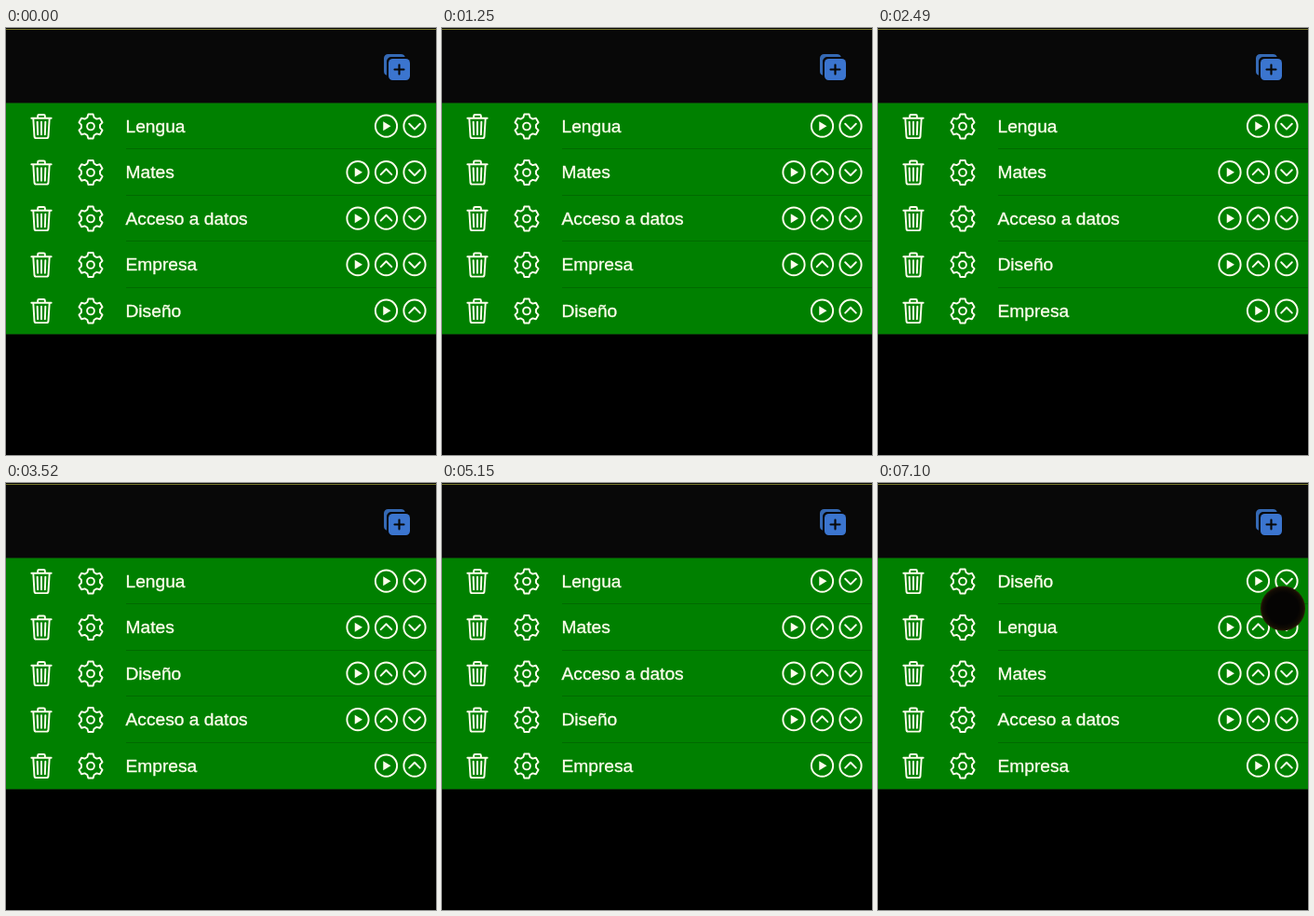
Recreate the animation shown at these times as an HTML page. Size 462x458 px, loop 7.15 s.

```html
<!DOCTYPE html>
<html lang="es">
<head>
<meta charset="utf-8">
<style>
  html, body { margin: 0; width: 100%; height: 100%; overflow: hidden; background: #000; }
  svg { display: block; }
  text { font: 19.2px "Liberation Sans", Arial, sans-serif; fill: #fdfdec; stroke: #fdfdec; stroke-width: .35; }
  symbol { overflow: visible; }
  .line { fill: none; stroke: #fdfdec; stroke-width: 32; stroke-linecap: round; stroke-linejoin: round; }
  .solid { fill: #fdfdec; }
</style>
</head>
<body>
<svg id="stage" width="462" height="458" viewBox="0 0 462 458">
  <defs>
    <radialGradient id="shade">
      <stop offset=".7" stop-color="#050403"/>
      <stop offset=".9" stop-color="#120c04"/>
      <stop offset="1" stop-color="#2a1e06"/>
    </radialGradient>
    <symbol id="trash" viewBox="0 0 512 512">
      <path class="line" d="M112 112l20 320c1 18 14 32 32 32h184c18 0 31-14 32-32l20-320M80 112h352M192 112V72a24 24 0 0 1 24-24h80a24 24 0 0 1 24 24v40M256 176v224M184 176l8 224M328 176l-8 224"/>
    </symbol>
    <symbol id="gear" viewBox="0 0 512 512">
      <circle class="line" cx="256" cy="256" r="64"/>
      <polygon class="line" id="teeth"/>
    </symbol>
    <symbol id="play" viewBox="0 0 512 512">
      <circle class="line" cx="256" cy="256" r="192"/>
      <path class="solid" d="M202 174L338 256L202 338z"/>
    </symbol>
    <symbol id="up" viewBox="0 0 512 512">
      <path class="line" d="M352 296l-96-96-96 96"/>
      <circle class="line" cx="256" cy="256" r="192"/>
    </symbol>
    <symbol id="down" viewBox="0 0 512 512">
      <path class="line" d="M352 216l-96 96-96-96"/>
      <circle class="line" cx="256" cy="256" r="192"/>
    </symbol>
  </defs>

  <rect width="462" height="80" fill="#080808"/>
  <rect y="1" width="462" height="1" fill="#77772c"/>
  <g transform="translate(404 26) scale(.0625)">
    <path fill="#3569b4" d="M396 80A72 72 0 0 0 328 32H104a72 72 0 0 0-72 72v224a72 72 0 0 0 48 68V160a80 80 0 0 1 80-80z"/>
    <rect x="112" y="112" width="368" height="368" rx="72" fill="#3b75cf"/>
    <path d="M296 216v160M216 296h160" stroke="#080808" stroke-width="34" stroke-linecap="round"/>
  </g>
  <rect y="80.5" width="462" height="248" fill="#008000"/>
  <rect y="80" width="462" height="1" fill="#0a4a08"/>
  <rect y="328" width="462" height="1" fill="#0a3a08"/>
  <g id="rows"></g>
  <circle id="dot" r="24" fill="url(#shade)"/>
</svg>
<script>
const LOOP = 7150, ROWS = 5, TOP = 105.2, PITCH = 49.5;
const $ = id => document.getElementById(id);

// Six gear teeth, four corners each
const corners = [[-21, 168], [-11.4, 218], [11.4, 218], [21, 168]];
const points = [];
for (let i = 0; i < 6; i++)
  for (const [deg, r] of corners) {
    const a = (i * 60 + deg - 90) * Math.PI / 180;
    points.push(256 + r * Math.cos(a), 256 + r * Math.sin(a));
  }
$('teeth').setAttribute('points', points.join(' '));

const icon = (name, x, y) =>
  `<use href="#${name}" x="${x - 15.5}" y="${y - 15.5}" width="31" height="31"/>`;

let markup = '';
for (let i = 0; i < ROWS; i++) {
  const y = TOP + i * PITCH;
  const buttons = ['play'];
  if (i > 0) buttons.push('up');
  if (i < ROWS - 1) buttons.push('down');
  markup += icon('trash', 38, y + .3) + icon('gear', 91, y + .3);
  buttons.reverse().forEach((name, k) => markup += icon(name, 439 - k * 30.5, y));
  markup += `<text x="128.5" y="${Math.round(y + 6.7)}"></text>`;
  if (i < ROWS - 1)
    markup += `<rect x="129" y="${Math.round(y + 23.8)}" width="333" height="1" fill="#006a00"/>`;
}
$('rows').innerHTML = markup;
const labels = document.querySelectorAll('#rows text');

// [time, index of the row that trades places with the next one]
const swaps = [[1900, 3], [3050, 2], [4450, 2], [5300, 2], [5720, 1], [6800, 0]];

function draw(now) {
  const t = now % LOOP;
  const names = ['Lengua', 'Mates', 'Acceso a datos', 'Empresa', 'Diseño'];
  for (const [at, i] of swaps)
    if (t >= at) [names[i], names[i + 1]] = [names[i + 1], names[i]];
  names.forEach((name, i) => {
    if (labels[i].textContent !== name) labels[i].textContent = name;
  });

  const p = Math.min(1, Math.max(0, (t - 5900) / 800));
  const ease = p * p * (3 - 2 * p);
  $('dot').setAttribute('cx', 436 - ease);
  $('dot').setAttribute('cy', 223.5 - 89 * ease);
  $('dot').style.display = t >= 5750 ? '' : 'none';
}

const start = performance.now();
(function tick() {
  draw(performance.now() - start);
  requestAnimationFrame(tick);
})();
</script>
</body>
</html>
```
